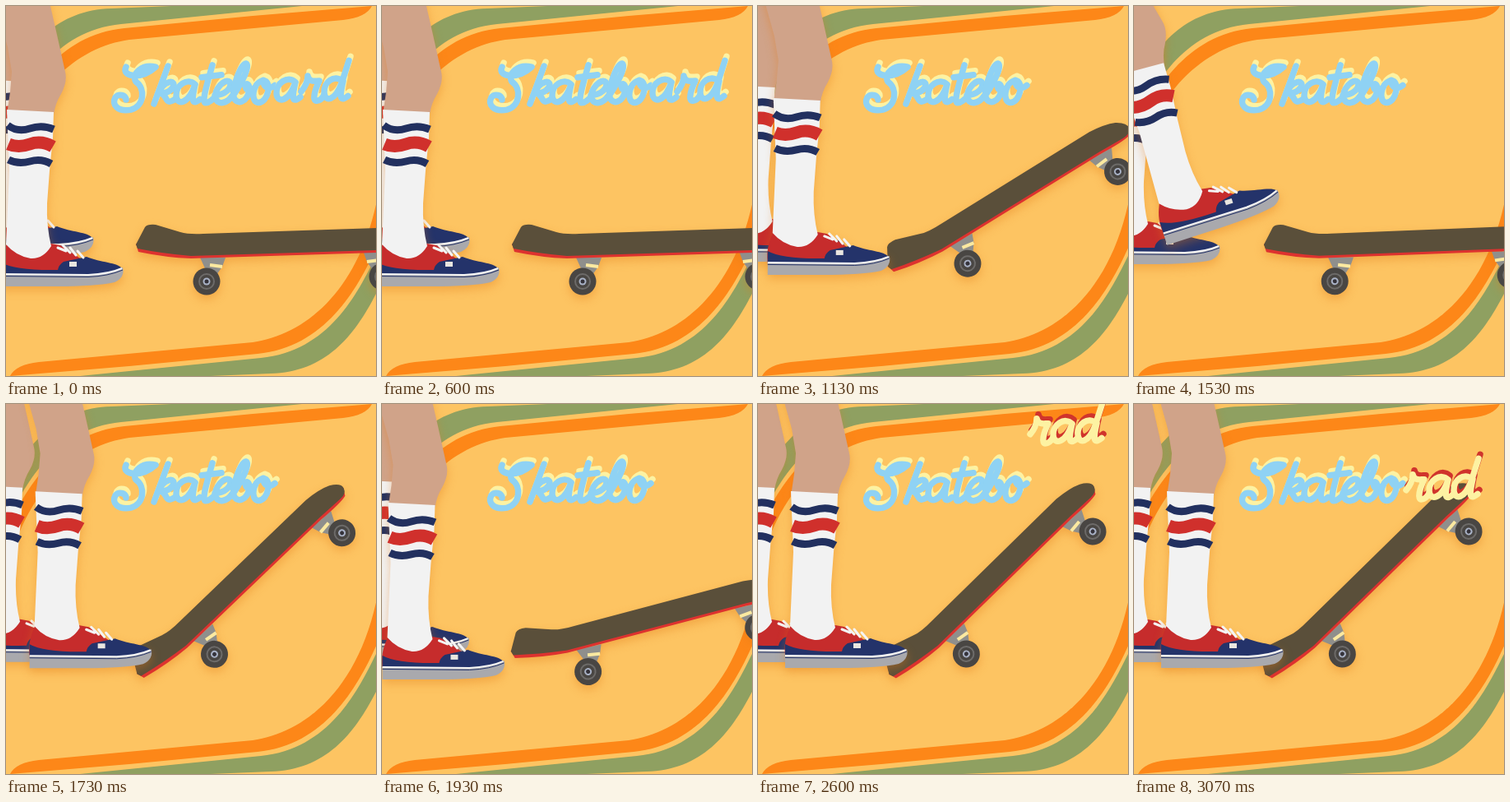
An HTML page for the animation above (3460 ms loop, 450x450 px).

```html
<!DOCTYPE html>
<html lang="en">
<head>
<meta charset="utf-8">
<title>Skateboard</title>
<style>
html, body { margin: 0; width: 100%; height: 100%; overflow: hidden; background: #fdc462; }
svg { display: block; width: 100vw; height: 100vh; }
.soft { filter: drop-shadow(0 5px 6px rgba(226, 122, 20, .38)); }
.word path { fill: none; stroke-width: 7.5; stroke-linecap: round; stroke-linejoin: round; }
</style>
</head>
<body>
<svg viewBox="0 0 450 450" role="img" aria-label="Skateboard">
  <defs>
    <g id="band">
      <path fill="#fd8718" d="M5 450Q12 436 40 433L300 409C365 400 430 345 452 232V290C430 340 390 415 306 423L150 438Z"/>
      <path fill="#8fa061" d="M90 450L310 428C395 420 430 345 452 300V346C425 400 390 445 322 447L200 452Z"/>
    </g>
    <g id="leg">
      <path fill="#d0a389" d="M-20 -90L-12 0L2 50L7 80L5 105L1 132H58Q60 118 67 107Q75 92 72 80L62 35L54 0L46 -90Z"/>
      <path fill="#c62c2c" d="M-6 326C-8 308 -3 298 1 289H55L66 291L98 312L78 327Z"/>
      <path fill="#24336a" d="M70 311L98 305C115 312 136 312 141 319V327H-6V312Q12 322 63 321Q64 315 70 311Z"/>
      <path fill="#f2f2f2" d="M1 126L58 129L57 160L53 200L50 240Q49 268 55 292Q45 308 30 307Q12 304 0 290L4 200Z"/>
      <g fill="none" stroke="#22305f" stroke-width="9">
        <path d="M2 145q12 9 27 4t29 1"/>
        <path stroke="#d0302c" stroke-width="15" d="M3 168q12 5 26 0t28 3"/>
        <path d="M3 187q12 6 26 2t26 3"/>
      </g>
      <path fill="none" stroke="#f4f4f4" stroke-width="3" stroke-linecap="round" d="M63 294l10 4M69 291l9 9M78 294l7 9M87 298l7 8"/>
      <rect x="77" y="311" width="9" height="6" fill="#e9e6e0"/>
      <path fill="#a9a9ad" d="M-6 326L100 327Q125 326 142 318Q145 330 132 336Q110 341 60 341H-6Z"/>
      <path fill="none" stroke="#f4f4f4" stroke-width="2" d="M-6 326L100 327Q125 326 141 319"/>
      <path fill="none" stroke="#24336a" d="M-6 328.500L100 329.500Q125 328.500 142 321"/>
    </g>
    <g id="truck">
      <path fill="#8f8f8c" d="M-8 -29H23L19 -18L12 -8L4 3L-6 -4L-2 -16Z"/>
      <path stroke="#fbe9a0" stroke-width="4" d="M4 -20L19 -18"/>
      <circle r="16.500" fill="#494643"/>
      <circle r="9" fill="none" stroke="#6d6b69" stroke-width="2"/>
      <circle r="4.500" fill="#a9b2c6"/>
      <circle r="2.500" fill="#34323a"/>
    </g>
  </defs>
  <rect width="450" height="450" fill="#fdc462"/>
  <use href="#band"/>
  <use href="#band" transform="rotate(180 225 225)"/>
  <g class="soft"><g id="board">
    <use href="#truck" x="244" y="335"/>
    <use href="#truck" transform="translate(458 329) scale(-1 1)"/>
    <path fill="#dd322f" d="M158 289L161 299Q195 306 225 307L450 300Q482 301 491 298L496 289Z"/>
    <path fill="#5a4f3a" d="M158 290L169 269Q172 265 182 266L212 275Q222 278 240 277L452 270Q473 271 485 276Q498 283 496 290Q494 297 484 297L450 297L225 304Q190 301 160 295Z"/>
  </g></g>
  <g id="words"></g>
  <g class="soft"><use id="back" href="#leg"/></g>
  <g class="soft"><use id="front" href="#leg"/></g>
</svg>
<script>
const $ = id => document.getElementById(id);

// Script letters on a baseline at y = 0: advance width and pen stroke
const glyphs = {
  S: [48, 'M16 -46C10 -34 34 -30 52 -46C36 -50 22 -38 28 -28C40 -20 38 2 22 6C6 9 -2 0 3 -9C7 -14 16 -12 16 -6'],
  k: [27, 'M2 0L19 -46M6 -11C14 -30 30 -30 25 -20C20 -13 14 -13 9 -13C19 -13 14 4 28 -6'],
  a: [30, 'M25 -23C16 -32 1 -22 2 -9C3 3 17 1 25 -23C21 -6 20 4 31 -5'],
  t: [17, 'M16 -46C10 -24 2 0 8 0C12 0 16 -4 20 -8M3 -31L27 -34'],
  e: [22, 'M2 -9C14 -9 24 -18 20 -25C14 -30 1 -16 3 -6C5 4 17 1 23 -8'],
  b: [24, 'M3 -9C14 -26 23 -44 18 -47C12 -48 0 -16 3 -6C6 4 20 1 22 -16C22 -22 18 -24 17 -20C18 -13 24 -13 29 -18'],
  o: [29, 'M15 -26C1 -23 -1 1 9 1C21 1 26 -25 15 -26C15 -17 22 -14 29 -20'],
  r: [28, 'M2 -11C8 -18 10 -25 10 -30C12 -22 18 -24 24 -24C19 -14 14 2 22 0C26 0 28 -4 30 -7'],
  d: [35, 'M24 -23C15 -32 1 -22 2 -9C3 3 15 1 23 -20L32 -48M25 -23C21 -6 20 4 31 -5']
};

function word(text, x, face, shade) {
  let strokes = '';
  for (const c of text) {
    const [width, pen] = glyphs[c];
    strokes += `<path d="${pen}" transform="translate(${x} ${123 - x / 45})"/>`;
    x += width;
  }
  $('words').insertAdjacentHTML('beforeend', `<g class="word">
    <g stroke="${shade}" transform="translate(2 -5)">${strokes}</g>
    <g stroke="${face}">${strokes}</g></g>`);
  return $('words').lastChild;
}

const BLUE = '#8fd2f4', CREAM = '#fdf2a2';
word('Skatebo', 130, BLUE, CREAM);
const ard = word('ard', 327, BLUE, CREAM);
const rad = word('rad', 329, CREAM, '#d0342c');

const LOOP = 3460, HITS = [980, 1700, 2380];
const LIFT = 210, PRESS = 170, RELEASE = 277;
const TILT = 42.5;

const ramp = (t, from, length) => Math.min(1, Math.max(0, (t - from) / length));
const smooth = v => v * v * (3 - 2 * v);
const place = (el, value) => el.setAttribute('transform', value);

// Each kick lifts the foot, presses the tail down and lets go; the last one holds
function kickAt(t) {
  const hit = HITS.find(h => t < h + RELEASE) ?? HITS.at(-1);
  const lift = smooth(ramp(t, hit - PRESS - LIFT, LIFT));
  const press = ramp(t, hit - PRESS, PRESS);
  const fall = hit === HITS.at(-1) ? 0 : ramp(t, hit, RELEASE);
  const grip = 1 - fall * fall;
  return {
    x: (32 * lift + 7 * press) * (1 - fall),
    y: (39 * press - 59 * lift) * grip,
    turn: -18 * lift * (1 - press),
    lean: lift * grip,
    tilt: TILT * Math.sin(press * Math.PI / 2) * grip
  };
}

function draw(now) {
  const t = now % LOOP;
  const { x, y, turn, lean, tilt } = kickAt(t);
  place($('front'), `translate(${x} ${y}) rotate(${turn} 28 300)`);
  place($('back'), `translate(${-36 - 2 * lean} ${10 * lean - 37})`);
  // The board rolls a little as it rocks on its rear wheel
  place($('board'), `translate(${11 * Math.sin(tilt / 20)} ${-.73 * tilt}) rotate(${-tilt} 244 335)`);

  const away = ramp(t, HITS[0], 140);
  place(ard, `translate(${70 * away} ${-150 * away}) rotate(${35 * away} 375 100)`);
  ard.style.display = away < 1 ? '' : 'none';

  const drop = ramp(t, HITS[2], 320);
  const hop = 6 * Math.sin(Math.PI * ramp(t, HITS[2] + 320, 200));
  place(rad, `translate(0 ${-130 * (1 - drop * drop) - hop})`);
  rad.style.display = drop ? '' : 'none';
}

const start = performance.now();
(function tick() {
  draw(performance.now() - start);
  requestAnimationFrame(tick);
})();
</script>
</body>
</html>
```
